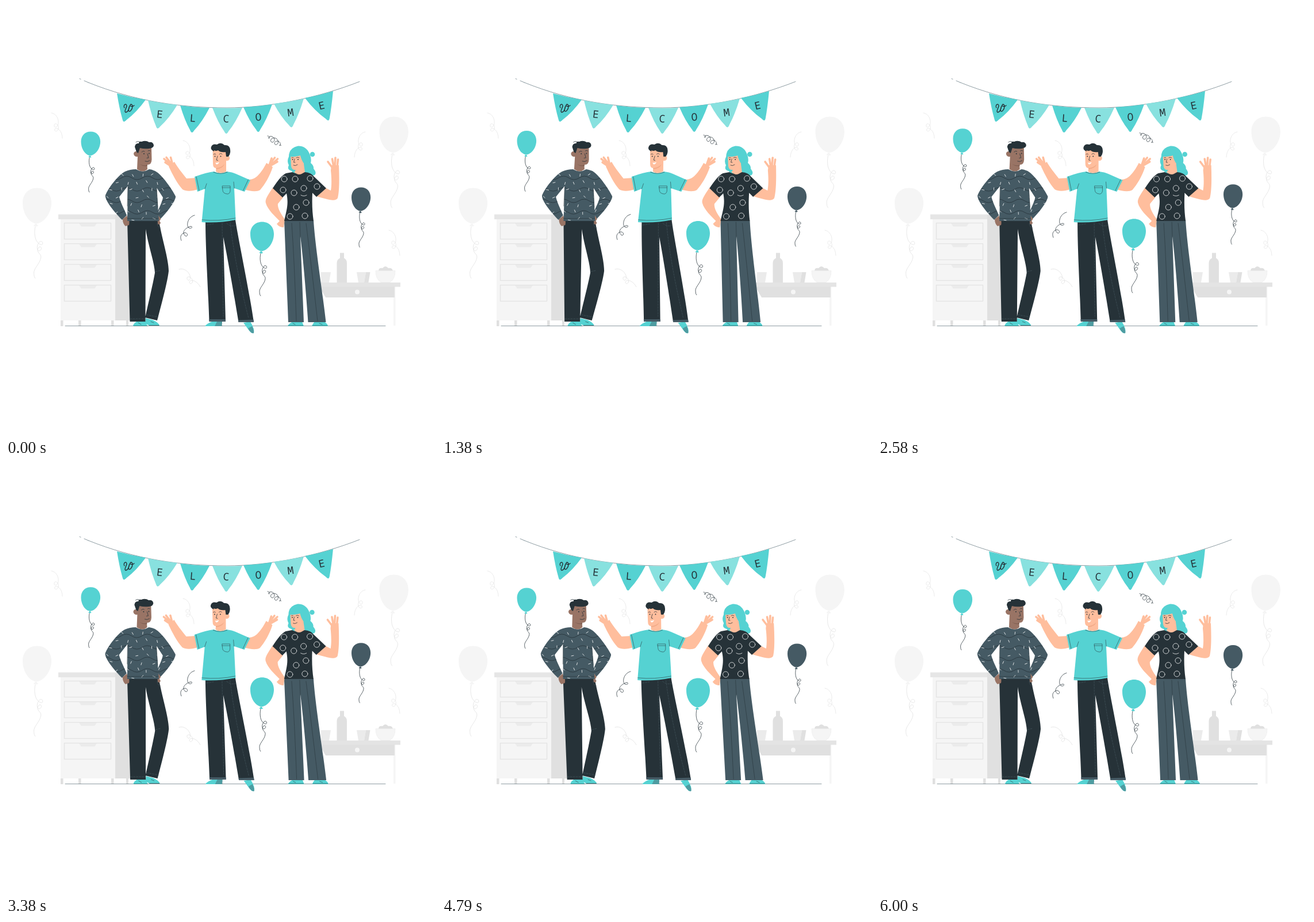
An HTML page for the animation above (6040 ms loop, 748 by 748 pixels).

```html
<!DOCTYPE html>
<html lang="en">
<head>
<meta charset="utf-8">
<title>Welcome</title>
<style>
html, body { margin: 0; width: 100%; height: 100%; overflow: hidden; background: #fff }
svg { display: block; width: 100vw; height: 100vh }
text { font: 18px "Noto Sans Mono", monospace; text-anchor: middle; fill: #263238 }
.teal { fill: #55d2d2 } .dark { fill: #263238 } .slate { fill: #455a64 }
.skin { fill: #ffbe9d } .brown { fill: #997465 }
.g1 { fill: #f5f5f5 } .g2 { fill: #ebebeb } .g3 { fill: #e0e0e0 }
.ln { fill: none; stroke: #263238; stroke-width: .75; stroke-linecap: round; stroke-linejoin: round }
.fine { stroke-width: .55 }
.pale { stroke: #e3e3e3 }
.soft { stroke: #5f737c; stroke-width: .7 }
.stitch { stroke: #4c6069; stroke-width: .5; stroke-dasharray: 3 2 }
.white { stroke: #fff }
.fingers { fill: none; stroke: #ffbe9d; stroke-width: 3.6; stroke-linecap: round; stroke-linejoin: round }
.string { vector-effect: non-scaling-stroke }
#float { stroke: #263238; stroke-width: .75 }
</style>
</head>
<body>
<svg viewBox="0 0 748 748">
<defs>
  <g id="balloon">
    <path stroke="none" d="M20.500 0C33 0 41 9 41 21C41 37 30 50 19.500 51C10 50 0 38 0 21C0 9 8 0 20.500 0ZM19 50l-3.500 4q3.500 1.700 6.500 .2z"/>
    <path class="string" fill="none" d="M18 55C16 64 17 76 24 80C31 84 29 73 24 77C19 82 20 92 25 89C29 86 25 81 22 86C19 92 27 94 26 99C25 108 15 115 16 122Q16 127 18 129"/>
  </g>
  <path id="curl" class="ln pale" d="M0 0C8 1 13 10 12 18C11 26 4 27 5 21C6 16 14 20 12 28C10 34 4 32 6 28C9 24 19 30 19 44"/>
  <g id="drawer">
    <rect x="101.500" y="377.500" width="81" height="28" fill="none" stroke="#e3e3e3" stroke-width="1.300"/>
    <path class="g2" d="M127 378h31l-4 5.500h-23z"/>
  </g>
  <path id="sweater" d="M226 284Q238 291 249 284Q258 285 264 290C273 297 288 317 295 331C296 337 283 356 269 370L263 361C266 350 272 341 273 333L262 316L266 374L211 374L212 313L197 332C199 341 205 352 210 364L202 372C186 356 171 336 173 329C178 317 194 295 207 288Q216 284 226 284Z"/>
  <clipPath id="knit"><use href="#sweater"/></clipPath>
  <path id="tee" d="M498 289Q510 295 520 289Q531 290 535 296L557 317L540 332L533 325C532 345 533 360 535 374L484 374C488 355 492 345 488 326L481 333L464 317Q478 295 487 291Z"/>
  <clipPath id="teeClip"><use href="#tee"/></clipPath>
</defs>

<!-- furniture -->
<path class="g3" d="M190 363h34v184h-34zM95 547h4.500v10H95zM126 547h4.500v10H126zM183 547h4.500v10H183zM209 547h4v10h-4z"/>
<path class="g1" d="M95 371h95v176H95z"/>
<path fill="#e6e6e6" d="M91 362.500h99v8.500H91z"/>
<use href="#drawer"/><use href="#drawer" y="36"/><use href="#drawer" y="72"/><use href="#drawer" y="108"/>
<path class="g1" d="M674 488h3.500v68H674z"/>
<path class="g3" d="M545 488h131v19H556z"/>
<path fill="#e4e4e4" d="M545 481h141v7.500H545z"/>
<circle class="g1" cx="611" cy="497.500" r="4"/>
<path class="g3" d="M581 429.500h7v9Q593 441 593 447V481H575.500V447Q575.500 441 581 438.500Z"/>
<path class="g2" d="M548 463h17l-3 18h-14zM610 463h16l-3 18h-10z"/>
<path class="g3" d="M626 463h7.500l-3 18H623zM648 461Q648 455 655 456Q660 450 665 456Q672 455 673 461Z"/>
<path class="g1" d="M643 460.500H677Q677 475 668 480.500H652Q643 475 643 460.500Z" stroke="#ededed" stroke-width=".7"/>

<!-- pale decoration -->
<g class="g1" stroke="#e8e8e8">
  <use href="#balloon" transform="translate(29 316.500) scale(1.220)"/>
  <use href="#balloon" transform="translate(649.500 192.500) scale(1.230)"/>
</g>
<use href="#curl" x="79" y="186"/>
<use href="#curl" x="308" y="234"/>
<use href="#curl" transform="translate(625 219) scale(-1 1)"/>
<use href="#curl" x="666" y="390"/>
<use href="#curl" transform="translate(301 458) rotate(-27)"/>

<!-- banner -->
<path class="ln soft" d="M128 126.500l2 .8M136 130l7 3"/>
<path class="ln soft" d="M143 133C225 166 305 177 383 177S545 159 615 131.500"/>
<g id="flags"></g>
<path class="ln" style="stroke-width:1.400" d="M206 177C203 172 210 168 210 174C209 179 205 183 208 185C212 185 214 179 215 174C212 181 213 186 217 182C221 178 221 171 217 171C214 173 218 177 223 173"/>

<path class="ln soft" d="M103 556.500H660"/>

<g id="people">
  <!-- left -->
  <path class="teal" d="M221 557Q221 552 229 548H242L246 557ZM243 543L255 546Q266 551 267 556H249L242 552Z"/>
  <path class="ln fine" d="M222 556.500H246M230 551l5 3M249 555.500H266M252 549l5 2"/>
  <path class="dark" d="M211 373H266C270 400 283 440 283 461C281 480 270 520 263 547L242 542C248 515 256 482 259 464C258 445 247 415 243 388L242.500 549H215.500Z"/>
  <path class="ln stitch" d="M263 378Q264 386 269 386M216 544H242M244 537L265 541M260 462l9-2"/>
  <path class="brown" d="M203 371L210 365Q216 372 214 381L208 383Q203 379 203 371ZM268 368L263 361L264 379Q268 382 269 377L267 374Q271 370 268 368Z"/>
  <use href="#sweater" class="slate"/>
  <g id="pattern" clip-path="url(#knit)"></g>
  <path class="ln fine" d="M212 313L211 348M262 316L264 350M211 369.500H265"/>
  <path class="brown" d="M229 246L253 247L253.500 267Q253 277 245.500 276L246 284Q238 291 228 284L229 262Q223 263 222 257Q223 252 229 253Z"/>
  <path fill="#7f5f53" d="M233 275Q240 279 246 276L246 278Q239 280 233 275Z"/>
  <path class="dark" d="M227 254L224 245Q225 238 231 239Q231 235 236 236Q243 233 249 237Q256 236 257 242Q257 247 249 248Q240 249 233 247L230 256Z"/>
  <path class="ln" d="M236 254Q239 251 241 253M247 252Q249 250 251 252M246 257L248 264L245 264.500M242 270Q246 272 250 269M234 237Q229 234 226 237"/>
  <circle class="dark" cx="240" cy="257" r=".9"/><circle class="dark" cx="249" cy="256.500" r=".9"/>

  <!-- middle -->
  <path class="teal" d="M346 557Q350 552 358 549H376L375 557ZM413 551L425 549Q433 562 431 569Q427 571 421 562Z"/>
  <path class="slate" d="M367 549H376V557H363ZM421 561L428 557Q432 565 431 569Q427 571 421 561Z" opacity=".45"/>
  <path class="dark" d="M347 375L399 372C403 400 424 500 431 550L404.500 550C398 510 386 440 378 402L382 549H353.500C352 500 347 420 347 375Z"/>
  <path class="slate" d="M353 545H382V549H354ZM404 546.500L430.500 545.500L431 550L404.500 550Z"/>
  <path class="ln stitch" d="M376 378L378 540M390 377Q398 450 422 543M349 381L361 379M384 378Q390 384 399 382"/>
  <path class="skin" d="M331 299L314 300C306 290 298 280 293 271L283 279C290 294 298 309 307 319C314 323 324 322 334 319ZM422 302C429 302 434 299 438 295C445 288 450 279 453 273L464 280C459 296 450 311 442 320C436 324 424 322 414 319Z"/>
  <path class="fingers" d="M288 277L275 266M288 275L279 263.500M289 273L286.500 263.500M286 278L277 272M458 277L462 265M458 276L467.500 264M460 277L472.500 266M458 279L472 271"/>
  <path class="teal" d="M362 288Q373 293 384 288Q394 289 400 292L425 303L415 323L397 317L399.500 372Q370 378 340.500 376L346 318L333 323L328 297Q350 289 362 288Z"/>
  <path class="ln fine" d="M331 297L336 321M421.500 302L412.500 321M346 318L349 309M397 317L396 306M341 372Q370 375 399 369M361 289Q373 294 385 289M376.500 313H390V322Q389 327 385 327Q377 326 377 321ZM376 316H390"/>
  <path class="skin" d="M359.500 249L384 251V261Q390 260 389 266Q387 270 383 269V288Q373 293 365 288L365.500 282Q360 282 360 274Z"/>
  <path fill="#f2ab88" d="M365.500 282Q375 281 380 275Q377 283 365.500 284Z"/>
  <path class="dark" d="M362 253Q355 250 357 245Q359 239 367 241Q374 236 380 242Q389 241 390 250Q391 257 387 262L383 262L382 254Q373 255 369 251Q365 253 362 251Z"/>
  <path class="ln" d="M361 258Q363 256 365 258M371 258Q374 255 376 258M368 261L366 268L368.500 268.500"/>
  <circle class="dark" cx="363.500" cy="261.500" r=".9"/><circle class="dark" cx="373.500" cy="261.500" r=".9"/>
  <path fill="#fff" d="M364 272.500Q368 273 371 271.500Q369 276 366 275.500Z"/>

  <!-- right -->
  <path class="teal" d="M490 557Q492 552 499 549H515L518 557ZM532 557Q534 552 537 549H553Q560 553 560 557Z"/>
  <path class="ln fine" d="M491 556H517M533 556H559M499 552l4 2M545 552l5 2"/>
  <path class="slate" d="M484 373H535C538 420 551 500 556.500 550H525.500C522 500 517 440 512 400L518 550H491Z"/>
  <path class="ln fine" d="M497 378Q502 450 505 548M522 378Q531 450 542 548M511 376L512 402"/>
  <circle class="teal" cx="533" cy="258" r="4.300"/>
  <path class="teal" d="M497 287Q488 285 492 277Q488 270 492 262Q492 247 508 243.500Q522 243 528 257Q532 266 530 273Q536 278 535 283Q541 290 537 294Q530 298 517 293L500 292Z"/>
  <path class="skin" d="M464 316C455 330 450 337 452 343C455 354 468 366 476 374L471 379Q475 385 483 385L485 371C477 360 472 351 473 344L482 333ZM555 316L565 321C567 310 566 295 565 286L566 277H579C580 300 580 322 577 334C573 342 555 335 540 331Z"/>
  <path class="fingers" d="M569 283L560 271M570 280L567.500 266M572 279L573 264M576 280L577.500 267"/>
  <path class="skin" d="M495 260Q508 260 512 255L515 266Q520 268 518 275L520 289Q510 297 502 289L504 285Q497 286 496 278Z"/>
  <path class="teal" d="M494 262Q496 250 508 248Q517 250 519 262L519 275Q514 269 512 260Q503 263 494 262Z"/>
  <use href="#tee" class="dark"/>
  <path class="skin" d="M501 288Q510 298 519.500 288Z"/>
  <g id="rings" class="ln white" clip-path="url(#teeClip)"></g>
  <path class="ln" d="M497 264Q498 263 500 264M505 264Q507 262 510 264M502 266L500.500 272L503 272M500 277Q503 279 507 276"/>
  <circle class="dark" cx="498.500" cy="267" r=".9"/><circle class="dark" cx="508" cy="267" r=".9"/>
</g>

<g id="float">
  <use href="#balloon" class="teal" transform="translate(130.500 218.500) scale(.820)"/>
  <use href="#balloon" class="teal" transform="translate(425 375.500)"/>
  <use href="#balloon" class="slate" transform="translate(601 315.500) scale(.810)"/>
  <path class="ln" d="M328 364C316 367 313 382 318 386C324 389 326 381 319 384C309 388 306 395 312 400C318 402 316 392 309 395C303 398 303 403 305 408"/>
  <path id="coil" class="ln"/>
</g>
</svg>
<script>
const LOOP = 6040, BOB = LOOP / 4, PIVOT = 402;
const $ = id => document.getElementById(id);
const add = (id, markup) => $(id).insertAdjacentHTML('beforeend', markup);

// Pennant: top corners, tip, letter, letter centre and tilt.
function flag([x1, y1, x2, y2, x, y, letter, lx, ly, tilt], i) {
  const fill = i % 2 ? '#88e1df' : '#55d2d2';
  // One side: the bulging control point and the point where the tip starts to round.
  const side = (a, b) => {
    const d = Math.hypot(x - a, y - b) / 8;
    return [[a + (x - a) * .4, b + (y - b) * .53], [x - (x - a) / d, y - (y - b) / d]];
  };
  const [c1, e1] = side(x1, y1), [c2, e2] = side(x2, y2);
  add('flags', `<path fill="${fill}" d="M${x1} ${y1}Q${c1} ${e1}Q${x} ${y + 1} ${e2}Q${c2} ${x2} ${y2}Q${(x1 + x2) / 2} ${(y1 + y2) / 2 + 1.5} ${x1} ${y1}Z"/>`);
  if (letter) add('flags', `<text transform="translate(${lx} ${ly}) rotate(${tilt})" y="6.5">${letter}</text>`);
}
[
  [193, 152, 243, 163, 204, 204],
  [247, 164, 298, 172, 263, 216, 'E', 267.5, 188, 6],
  [303, 173, 354, 177, 323, 223, 'L', 325, 195, 4],
  [359, 177, 411, 177, 383, 225, 'C', 383, 196, 2],
  [413, 176, 463, 171, 439, 222, 'O', 439, 193, -4],
  [466, 170, 518, 161, 497, 214, 'M', 495, 185, -8],
  [520, 160, 569, 148, 562, 202, 'E', 549, 173, -13]
].forEach(flag);

// Sweater: wavy stripes and scattered flecks.
let seed = 7;
const rnd = () => (seed = seed * 16807 % 2147483647) / 2147483647;
for (let y = 299; y < 375; y += 20)
  add('pattern', `<path class="ln" d="M165 ${y}q9-6 18 0${'t18 0'.repeat(7)}"/>`);
for (let y = 291; y < 370; y += 13)
  for (let x = 172; x < 296; x += 18) {
    const a = rnd() * 180, px = x + (y % 2) * 9 + rnd() * 5, py = y + rnd() * 5;
    add('pattern', `<path class="ln white" d="M-2 0h4" transform="translate(${px} ${py}) rotate(${a})"/>`);
  }

[[484, 301], [503, 301], [529, 300], [482, 320], [501, 325], [518, 317], [541, 314],
 [505, 350], [522, 342], [494, 366], [520, 365]]
  .forEach(([x, y]) => add('rings', `<circle cx="${x}" cy="${y}" r="5"/>`));
add('rings', '<path d="M513 329q5 3 10 0"/>');

const coil = [];
for (let u = 0; u <= 1; u += .01) {
  const a = 8 * Math.PI * u, r = 5 * Math.sin(Math.PI * u);
  coil.push([455 + 24 * u + r * Math.sin(a), 226 + 17 * u - r * Math.cos(a)]);
}
$('coil').setAttribute('d', 'M' + coil.join('L'));

function draw(now) {
  const t = now % LOOP, p = t / LOOP, q = t % BOB / BOB;
  const sway = p < .25 ? 4 * p : p < .75 ? 2 - 4 * p : 4 * p - 4;
  const k = -Math.tan(Math.PI / 180) * sway;
  const rise = 9 * (1 - Math.abs(1 - 2 * q));
  $('people').setAttribute('transform', `matrix(1 0 ${k} 1 ${-k * PIVOT} 0)`);
  $('float').setAttribute('transform', `translate(0 ${-rise})`);
}
const start = performance.now();
function tick() {
  draw(performance.now() - start);
  requestAnimationFrame(tick);
}
tick();
</script>
</body>
</html>
```
